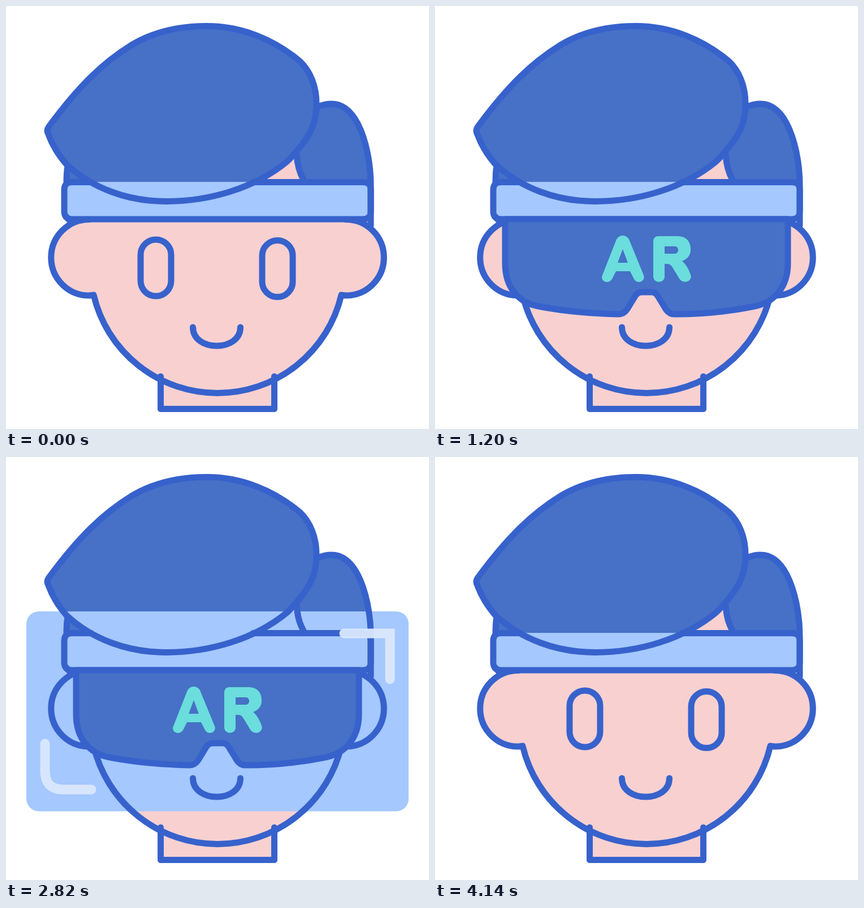
An HTML page for the animation above (4.35 s loop, 748x748 px).

```html
<!DOCTYPE html>
<html lang="en">
<head>
<meta charset="utf-8">
<title>AR headset</title>
<style>
html, body { margin: 0; width: 100%; height: 100%; overflow: hidden; background: #fff; }
svg { display: block; width: 100%; height: 100%; }
.line { fill: none; stroke: #3762cc; stroke-width: 11; stroke-linecap: round; stroke-linejoin: round; }
.skin { fill: #f9d0d0; }
.hair { fill: #4671c6; }
.light { fill: #a4c8ff; }
.teal { fill: #6bdddd; fill-rule: evenodd; }
.shine { fill: none; stroke: #dbe8fd; stroke-width: 17; stroke-linecap: round; }
</style>
</head>
<body>
<svg viewBox="0 0 748 748">
  <defs>
    <path id="neck" d="M273.5 655V712.5H474.5V655"/>
    <path id="face" d="M147 377.5A67 67 0 0 0 147 512L155 511A225 225 0 0 0 593 511L601 512A67 67 0 0 0 601 377.5"/>
    <path id="back" d="M552 178C580 167 604 174 622 208C637 237 645 280 645 316V388"/>
    <path id="part" d="M514 262C515 281 519 295 526 307"/>
    <path id="top" d="M76 213C130 140 172 100 222 69C262 45 308 35.5 355 35.5C418 35.5 475 60 520 98C538 115 549 142 549 173C549 193 545 212 534 230C522 248 512 261 497 275C440 322 360 345.5 283 345.5C215 345.5 152 322 107 280C92 263 82 246 75 227C72 222 73 217 76 213Z"/>
  </defs>

  <!-- flat fills -->
  <g class="skin">
    <use href="#neck"/><use href="#face"/>
    <path d="M440 250H530V316H420Z"/>
  </g>
  <g class="hair">
    <path d="M552 178C580 167 604 174 622 208C637 237 645 280 645 316H531C519 297 514 281 514 262L545 200Z"/>
    <use href="#top"/>
  </g>
  <rect class="light" x="103" y="311" width="542" height="66" rx="14"/>
  <rect class="light" id="panel" y="273" height="353.5" rx="22"/>

  <!-- outlines -->
  <path class="hair" d="M109 283C107 293 107 303 107 312H157C135 304 120 293 109 283Z"/>
  <g class="line">
    <use href="#neck"/><use href="#face"/><use href="#back"/><use href="#part"/><use href="#top"/>
    <path d="M109 283C107 293 107 303 107 314M106 372L116 383"/>
    <path d="M150 311.5H117Q103 311.5 103 325V363Q103 377 117 377H631Q645 377 645 363V325Q645 311.5 631 311.5H437"/>
    <rect class="eye" x="238" width="54" data-y="463"/>
    <rect class="eye" x="453" width="54" data-y="464.5"/>
  </g>
  <path class="line" id="mouth" style="fill:#3762cc"/>

  <path class="line" id="lens" style="fill:#4671c6" d="M124 377V455C124 500 150 527 188 532C232 540 280 544 324 545Q334 545 340 536L354 513Q358 506 366 506H383Q390 506 394 513L408 536Q415 546 425 545C470 545 515 541 560 532C600 526 624 497 624 455V377Z"/>
  <path class="teal" id="A"/>
  <path class="teal" id="R"/>
  <g class="shine" id="shine">
    <path d="M598 312H679V393"/>
    <path d="M69 507V555Q69 588 101 588H151"/>
  </g>
</svg>
<script>
const LOOP = 4350, STEP = 30;
const el = id => document.getElementById(id);
const eyes = document.querySelectorAll('.eye');
const ramp = (t, a, b) => Math.min(1, Math.max(0, (t - a) / (b - a)));
const hold = (t, a, b, c, d) => ramp(t, a, b) - ramp(t, c, d);
const hump = (t, a, b) => Math.sin(Math.PI * ramp(t, a, b));

// Contours of each letter, outer edge first, as sampled points one after another.
function contours(...shapes) {
  return shapes.map(d => {
    const p = document.createElementNS('http://www.w3.org/2000/svg', 'path');
    p.setAttribute('d', d);
    return { p, len: p.getTotalLength() };
  });
}
const letters = {
  A: contours(
    'M345 469H320L314 481C308 494 291 487 296 476L320 415C324 403 340 403 344 415L369 476C373 487 357 494 351 481Z',
    'M341 454H323L332 430Z'),
  R: contours(
    'M437 451C447 447 452 440 452 431C452 415 443 407 428 407H396Q386 407 386 417V478C386 491 406 491 406 478V456H410C416 456 418 459 421 464L432 482C439 493 456 487 452 475C449 467 445 458 437 451Z',
    'M406 425H424C432 425 432 438 424 438H406Z')
};

// Fill only the first part of a letter's outline.
function trim(id, amount) {
  let left = amount * letters[id].reduce((sum, c) => sum + c.len, 0), d = '';
  for (const { p, len } of letters[id]) {
    const end = Math.min(left, len);
    if (end < 1) break;
    const n = Math.ceil(end);
    for (let i = 0; i <= n; i++) {
      const q = p.getPointAtLength(end * i / n);
      d += (i ? 'L' : 'M') + q.x.toFixed(2) + ' ' + q.y.toFixed(2);
    }
    d += 'Z';
    left -= end;
  }
  el(id).setAttribute('d', d);
}

function draw(t) {
  const blink = hump(t, 0, 345);
  for (const eye of eyes) {
    const h = 100 * (1 - blink);
    eye.setAttribute('y', eye.dataset.y - h / 2);
    eye.setAttribute('height', h);
    eye.setAttribute('rx', 27);
    eye.setAttribute('ry', Math.min(27, h / 2));
  }

  const open = hump(t, 375, 1080) + hump(t, 1560, 2250);
  const lip = 612 - 35 * open;
  el('mouth').setAttribute('d', `M330.5 568C330.5 612 414.5 612 414.5 568C414.5 ${lip} 330.5 ${lip} 330.5 568Z`);

  const drop = hold(t, 540, 750, 3960, 4140);
  el('lens').style.display = drop ? '' : 'none';
  el('lens').setAttribute('transform', `translate(0 377) scale(1 ${drop}) translate(0 -377)`);

  trim('A', hold(t, 780, 1080, 3460, 3780));
  trim('R', hold(t, 930, 1200, 3360, 3630));

  const show = hold(t, 1560, 2100, 2790, 3300);
  const half = 338 * (1 - (1 - show) ** 3.1);
  el('panel').setAttribute('x', 374 - half);
  el('panel').setAttribute('width', 2 * half);
  el('shine').style.opacity = show;
}

function frame() {
  draw(Math.floor(performance.now() % LOOP / STEP) * STEP);
  requestAnimationFrame(frame);
}
frame();
</script>
</body>
</html>
```
